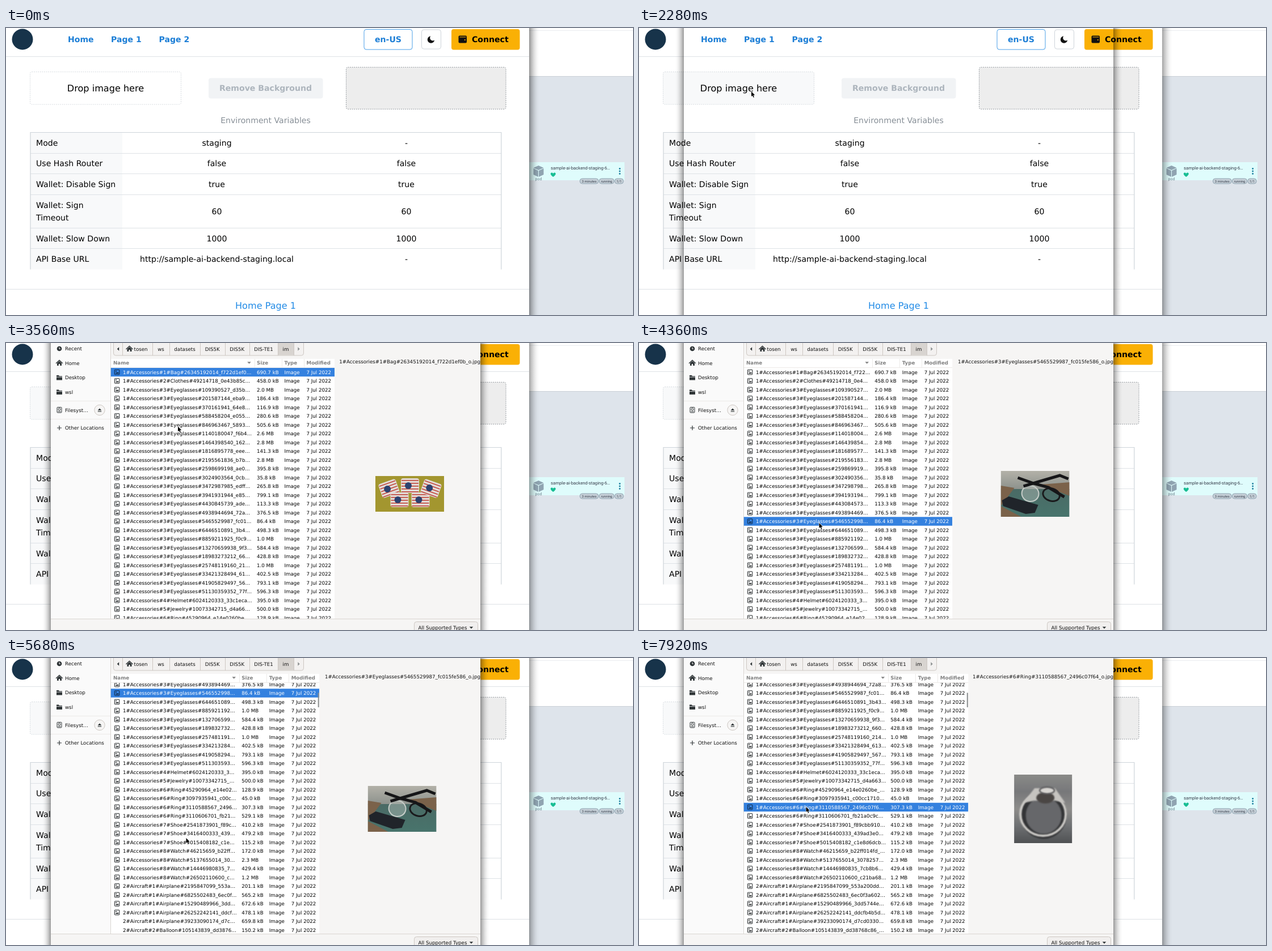
Animation, 1105 px wide and 507 px high, one loop 8 s. Source, as an HTML page with a canvas:

```html
<!DOCTYPE html>
<html lang="en">
<head>
<meta charset="utf-8">
<title>File picker</title>
<style>
html, body { margin: 0; width: 100%; height: 100%; overflow: hidden; background: #fff; }
canvas { display: block; }
</style>
</head>
<body>
<canvas id="stage" width="1105" height="507"></canvas>
<script>
const ctx = document.getElementById('stage').getContext('2d');
ctx.textRendering = 'geometricPrecision';

const LOOP = 8000, TICK = 40;
const SANS = '"DejaVu Sans", sans-serif', ROBOTO = 'Roboto, sans-serif';
const BLUE = '#1c7ed6', INK = '#2e3436', CHROME = '#f6f5f4', EDGE = '#cdc7c2', FAINT = '#eceae8';
const UI = 8.7, ROW = 15.5, NOTCH = 50.6;
const LEFT = 184.5, RIGHT = 836, LIST_TOP = 44, LIST_END = 487;

// Folder, first id, and for a run of files the last id and the count
const FOLDERS = `1#Accessories#1#Bag 26345192014
1#Accessories#2#Clothes 49214718
1#Accessories#3#Eyeglasses 109390527 5465529987 16
1#Accessories#3#Eyeglasses 6446510891 51130359352 8
1#Accessories#4#Helmet 6024120333
1#Accessories#5#Jewelry 10073342715
1#Accessories#6#Ring 45290964
1#Accessories#6#Ring 3097935941
1#Accessories#6#Ring 3110588567
1#Accessories#6#Ring 3110606701
1#Accessories#7#Shoe 2541873901 5015408182 3
1#Accessories#8#Watch 46215659 26502110600 4
2#Aircraft#1#Airplane 2195847099 39233090174 5
2#Aircraft#2#Balloon 105143839`;

// Files that get opened in the preview pane
const PICKS = {
  26345192014: { hash: 'f722d1ef0b', size: '690.7 kB', right: 579, w: 121, h: 63, draw: cookies },
  5465529987: { hash: 'fc015fe586', size: '86.4 kB', right: 552.2, w: 121, h: 81, draw: glasses },
  3097935941: { hash: 'c00cc1710c', size: '45.0 kB', right: 580.3, w: 121, h: 99, draw: beadRing },
  3110588567: { hash: '2496c07f64', size: '307.3 kB', right: 580.3, w: 102, h: 121, draw: silverRing }
};

let seed = 7;
const random = () => (seed = seed * 16807 % 2147483647) / 2147483647;
const randomHash = () => Array.from({ length: 10 }, () => Math.floor(random() * 16).toString(16)).join('');
const randomSize = () => random() < 0.14
  ? (1 + 2 * random()).toFixed(1) + ' MB'
  : (25 + 780 * random() ** 1.3).toFixed(1) + ' kB';

const files = FOLDERS.split('\n').flatMap(line => {
  const [folder, first, last = first, count = 1] = line.split(' ');
  return Array.from({ length: +count }, (_, i) => {
    const id = Math.round(+first + (last - first) * (i / Math.max(1, count - 1)) ** 1.5);
    const pick = PICKS[id];
    return {
      name: `${folder}#${id}_${pick ? pick.hash : randomHash()}_o.jpg`,
      size: pick ? pick.size : randomSize(),
      pick
    };
  });
});

// Timeline: when a row gets selected, when the wheel turns, where the pointer goes
const SELECTED = [[0, -1], [3080, 0], [4200, 17], [6680, 29], [7760, 30]];
const WHEEL = [4680, 4880, 5240, 5280, 5680];
const MOVES = [
  [2480, 2840, 303, 147.5], [3560, 4000, 317.5, 318], [6120, 6360, 314.5, 249.5],
  [7160, 7280, 304.5, 275], [7480, 7680, 294.5, 263]
];

const ramp = (t, a, b) => Math.min(1, Math.max(0, (t - a) / (b - a)));
const easeOut = p => 1 - (1 - p) ** 3;
const overshoot = p => 1 + 2 * (p - 1) ** 3 + (p - 1) ** 2;
const selectedAt = t => SELECTED.filter(s => s[0] <= t).pop()[1];
const scrollAt = t => WHEEL.filter(w => w <= t).length * NOTCH;

function pointerAt(t) {
  const p = ramp(t, 480, 1320);
  let x = 1100 - 902 * overshoot(p), y = 507 - 395 * easeOut(p);
  for (const [from, to, x1, y1] of MOVES) {
    const k = easeOut(ramp(t, from, to));
    x += (x1 - x) * k;
    y += (y1 - y) * k;
  }
  return [x, y];
}

function text(s, x, y, { size = 14.08, color = '#000', weight = 400, align = 'left', font = SANS } = {}) {
  ctx.font = `${weight} ${size}px ${font}`;
  ctx.fillStyle = color;
  ctx.textAlign = align;
  ctx.fillText(s, x, y + size * 0.365);
}
const label = (s, x, y, opts) => text(s, x, y, { size: UI, color: '#111', ...opts });

function rect(x, y, w, h, fill) {
  ctx.fillStyle = fill;
  ctx.fillRect(x, y, w, h);
}

function paint(fill, stroke, width = 1) {
  if (fill) { ctx.fillStyle = fill; ctx.fill(); }
  if (stroke) { ctx.strokeStyle = stroke; ctx.lineWidth = width; ctx.stroke(); }
}

function box(x, y, w, h, r, fill, stroke, dash = []) {
  ctx.beginPath();
  ctx.roundRect(x, y, w, h, r);
  ctx.setLineDash(dash);
  paint(fill, stroke);
  ctx.setLineDash([]);
}

// Points are written as an SVG path
function shape(d, fill, stroke, width = 1) {
  const path = new Path2D(d);
  if (fill) { ctx.fillStyle = fill; ctx.fill(path); }
  if (stroke) { ctx.strokeStyle = stroke; ctx.lineWidth = width; ctx.stroke(path); }
}

function oval(x, y, rx, ry, fill, stroke, width, turn = 0) {
  ctx.beginPath();
  ctx.ellipse(x, y, rx, ry, turn, 0, Math.PI * 2);
  paint(fill, stroke, width);
}

function place(x, y, draw, turn = 0) {
  ctx.save();
  ctx.translate(x, y);
  ctx.rotate(turn);
  draw();
  ctx.restore();
}

const triangle = (x, y, turn, fill = INK) => place(x, y, () => shape('M-3.3-1.7H3.3L0 1.7Z', fill), turn);

function gradient(x0, y0, x1, y1, colors) {
  const g = ctx.createLinearGradient(x0, y0, x1, y1);
  colors.forEach((c, i) => g.addColorStop(i / (colors.length - 1), c));
  return g;
}

function shadow(from, to, strength) {
  const fade = Array.from({ length: 6 }, (_, i) => `rgba(0,0,0,${strength * (1 - i / 5) ** 1.8})`);
  rect(Math.min(from, to), 0, Math.abs(to - from), 507, gradient(from, 0, to, 0, fade));
}

function drawCluster() {
  rect(920, 0, 185, 507, '#fff');
  rect(920, 4, 185, 1, '#e9ecef');
  rect(920, 85, 185, 422, '#dee4eb');
  rect(920, 85, 185, 1, '#c9d0d6');

  rect(920, 237, 170, 32, '#dffcfc');
  place(938.5, 253, () => shape('M0-10 9-6 0-2-9-6ZM-9-5-.5-1V10L-9 6ZM9-5 .5-1V10L9 6Z', '#8fa4b1'));
  text('pod', 938.5, 266, { size: 7, color: '#6d7f8b', align: 'center', font: ROBOTO });
  text('sample-ai-backend-staging-6…', 960, 247.5, { size: 7.75, color: '#363c4a', font: ROBOTO });
  place(964.3, 259, () => shape('M0 4C-9-2-2-6 0-2C2-6 9-2 0 4Z', '#18be94'));
  for (let y = 248.5; y < 258; y += 4.5) oval(1081.7, y, 1.4, 1.4, '#1b7f9e');
  [['3 minutes', 1011.5, 32.5], ['running', 1045.5, 26], ['1/1', 1073, 15]].forEach(([s, x, w]) => {
    box(x, 266, w, 9, 4, '#c6d0d8', '#8fa4b1');
    text(s, x + w / 2, 270.5, { size: 5.9, color: '#363c4a', align: 'center', font: ROBOTO });
  });
}

function drawHeader() {
  const bold = { weight: 700 };
  rect(0, 50, 922, 1, '#dee2e6');
  oval(29, 20, 18.5, 18.5, '#17334a');
  [['Home', 109], ['Page 1', 185], ['Page 2', 269.5]].forEach(([s, x]) => text(s, x, 20, { ...bold, color: BLUE }));
  box(631, 2.5, 85, 35.5, 4, '#fff', '#4a9fe8');
  text('en-US', 673.5, 20, { ...bold, color: BLUE, align: 'center' });
  box(732.5, 3, 34, 34, 4, '#fff', '#ced4da');
  oval(749, 20.5, 6.2, 6.2, '#111');
  oval(752.2, 17.4, 5, 5, '#fff');
  box(785, 2, 120.5, 36.5, 4, '#fab005');
  box(797.5, 13.5, 14.5, 13, 2, '#111');
  rect(799.5, 15.5, 11, 1, '#fab005');
  oval(808.8, 21, 1.1, 1.1, '#fab005');
  text('Connect', 821, 20, bold);
}

function drawTable() {
  const rows = [
    ['Mode', 'staging', '-'], ['Use Hash Router', 'false', 'false'], ['Wallet: Disable Sign', 'true', 'true'],
    ['Wallet: Sign\nTimeout', '60', '60'], ['Wallet: Slow Down', '1000', '1000'],
    ['API Base URL', 'http://sample-ai-backend-staging.local', '-']
  ];
  rect(43, 184, 162, 242.5, '#f8f9fa');
  let y = 184.3;
  for (const [name, a, b] of rows) {
    const lines = name.split('\n'), h = 14.7 + 22 * lines.length, mid = y + h / 2;
    rect(43, Math.round(y - 0.4), 830, 1, y > 185 ? '#dee2e6' : '#ced4da');
    lines.forEach((s, i) => text(s, 53, mid + 22 * (i - (lines.length - 1) / 2)));
    text(a, 371.5, mid, { align: 'center' });
    text(b, 705.5, mid, { align: 'center' });
    y += h;
  }
  rect(42.4, 184, 1.2, 242.5, '#ced4da');
  rect(872.2, 184, 1.2, 242.5, '#ced4da');
}

function drawPage(t) {
  const dots = [1.8, 1.8], center = { align: 'center' };
  rect(0, 0, 922, 507, '#fff');
  drawHeader();
  box(42.5, 77.5, 266, 57.5, 3, t >= 1080 ? '#f8f9fa' : '#fff', '#d3d8dd', dots);
  text('Drop image here', 175.5, 106, { ...center, size: 16.1 });
  box(357, 88.5, 201.5, 36, 4, '#f1f3f5');
  text('Remove Background', 457.5, 106, { ...center, color: '#adb5bd', weight: 700 });
  box(599.5, 69.3, 281.5, 74, 3, '#ededed', '#8a9096', dots);
  text('Environment Variables', 457.5, 163, { ...center, color: '#868e96' });
  drawTable();
  rect(0, 461, 922, 1, '#dee2e6');
  text('Home Page 1', 457.5, 490.5, { ...center, size: 16.1, color: '#228be6' });
  shadow(922, 940, 0.42 - 0.06 * ramp(t, 1880, 1960));
}

const house = (x, y) => place(x, y, () => {
  shape('M-6 .5 0-5 6 .5', null, INK, 1.3);
  shape('M-4 0 0-3.4 4 0V4.5H1.2V1.5H-1.2V4.5H-4Z', INK);
});

const folder = (x, y) => place(x, y, () => {
  shape('M-5-4H-1L0-2.6H5V4.5H-5Z', INK);
  rect(-5, -1.3, 10, 0.8, '#fafafa');
});

function drawSidebar() {
  rect(79, 0, 105, LIST_END, '#fafafa');
  rect(184, 0, 1, LIST_END, '#dad6d2');
  oval(94, 10, 4.3, 4.3, INK);
  shape('M94 7.5V10.3H96', null, '#fff');
  house(94, 35.5);
  folder(94, 61);
  folder(94, 86.5);
  rect(79, 102, 105, 1, FAINT);
  rect(79, 134, 105, 1, FAINT);
  box(90, 113.5, 8, 9.5, 1, null, INK);
  oval(94, 117, 2, 2, null, INK);
  rect(91.5, 120.5, 5, 1, INK);
  oval(165, 118.5, 9.2, 9.2, CHROME, EDGE);
  triangle(165, 117.3, Math.PI);
  rect(161.8, 120.3, 6.4, 1.2, INK);
  shape('M90 150H98M94 146V154', null, INK, 1.2);
  ['Recent', 'Home', 'Desktop', 'wsl'].forEach((s, i) => label(s, 104, 10 + i * 25.6));
  label('Filesyst…', 104, 118.5);
  label('Other Locations', 104, 150);
}

function drawPathBar() {
  box(189.5, -8, 335, 30, 4, '#f3f1f0', EDGE);
  rect(479, 0, 28, 21.5, '#d8d4d0');
  rect(205, 0, 1, 22, EDGE);
  triangle(197.5, 10.5, Math.PI / 2);
  house(217.5, 10.5);
  label('tosen', 225.5, 10.5);
  let x = 258;
  const crumbs = [['ws', 30], ['datasets', 54], ['DIS5K', 43.5], ['DIS5K', 43.5], ['DIS-TE1', 50], ['im', 28]];
  for (const [s, w] of crumbs) {
    rect(Math.round(x), 0, 1, 22, EDGE);
    label(s, x + w / 2, 10.5, { align: 'center' });
    x += w;
  }
  rect(x, 0, 1, 22, EDGE);
  triangle(516, 10.5, -Math.PI / 2, '#8b8e8f');
}

const imageIcon = (y, color) => place(195.6, y, () => {
  box(-4.2, -4.3, 8.4, 8.6, 0.8, null, color);
  shape('M-3 2.6-1 .2 .3 1.3 1.7-.2 3.2 2.6ZM-2.6-2.4H-.6V-1H-2.6Z', color);
});

function fit(s, room) {
  ctx.font = `400 ${UI}px ${SANS}`;
  if (ctx.measureText(s).width <= room) return s;
  while (ctx.measureText(s + '…').width > room) s = s.slice(0, -1);
  return s + '…';
}

function drawList(t, right) {
  const scroll = scrollAt(t), selected = selectedAt(t);
  const columns = [['Size', right - 137], ['Type', right - 88.5], ['Modified', right - 49.5]];
  rect(185, 28, right - 185, LIST_END - 28, '#fff');
  ctx.save();
  ctx.beginPath();
  ctx.rect(LEFT, LIST_TOP, right - LEFT, LIST_END - LIST_TOP);
  ctx.clip();
  files.forEach((f, i) => {
    const top = 51.5 + i * ROW, y = top - scroll, on = i === selected;
    const color = on ? '#fff' : '#000';
    // Thumbnails arrive shortly after a row scrolls into view
    const ready = t >= 3320 && top - scrollAt(t - 80) < LIST_END + 14;
    if (on) rect(LEFT, y - ROW / 2, right - LEFT, ROW, '#3481df');
    if (ready) imageIcon(y, on ? '#0d2540' : '#1c2022');
    label(fit(f.name, right - 350.5), 206, y, { color });
    [f.size, 'Image', '7 Jul 2022'].forEach((s, c) => label(s, columns[c][1], y, { color }));
  });
  if (scroll) box(right - 2.5, 46 + scroll * 0.06, 2, 26, 1, '#8b8e8f');
  ctx.restore();

  const head = { color: '#808080', weight: 700 };
  label('Name', 189, 35, head);
  triangle(right - 150.5, 35, 0, '#808080');
  columns.forEach(([s, x]) => {
    label(s, x, 35, head);
    rect(Math.round(x - 4.5), 28, 1, 15, FAINT);
  });
  rect(185, 43, right - 185, 1, FAINT);
}

function cookies() {
  rect(0, 0, 121, 63, '#a3962f');
  for (let i = 0; i < 5; i++) {
    const low = i % 2;
    place(24 + i * 18.5, low ? 42 : 22 - 5 * Math.sin(i * Math.PI / 4), () => {
      box(-16, -13, 32, 26, 4, '#e3dcd8');
      for (let s = -10; s < 12; s += 5) rect(-15, s, 30, 1.6, '#c0453a');
      oval(-3, 0, 6, 6, '#2c4270');
    }, low ? 0 : (i - 2) * 0.17);
  }
}

function glasses() {
  rect(0, 0, 121, 33, gradient(0, 0, 0, 33, ['#b3b1a8', '#8c918c']));
  rect(0, 32, 121, 49, gradient(0, 32, 0, 81, ['#4a6a65', '#48746c']));
  shape('M0 26 24 30 0 62ZM70 24 121 20V44ZM0 62 36 81H0Z', '#7b624a');
  shape('M2 52 14 45 66 60 60 74 44 76 4 62Z', '#20242a');
  oval(52, 40, 15, 14, 'rgba(190,200,196,.4)', '#c7cdc9', 2, 0.2);
  oval(89, 42, 15, 11, null, '#1a1a1c', 3, 0.3);
  shape('M30 12 58 22 84 29 112 46M40 27 70 18 104 8 119 14', null, '#161618', 5);
}

function beadRing() {
  ctx.filter = 'blur(1.5px)';
  rect(-5, -5, 131, 109, gradient(0, 0, 40, 99, ['#6b5c52', '#a8937d', '#b58a5c']));
  shape('M30 0H121V30L70 16Z', '#c3a684');
  oval(78, 42, 42, 22, '#8a6a42', '#cdbb96', 6, 0.3);
  shape('M12 20 46 42 118 60 106 80 52 92 8 86Z', '#d6cec2');
  shape('M20 46 52 60 108 70M18 70 52 77 100 77', null, '#8f7761', 3);
  for (let i = 0; i < 5; i++) oval(5 + i % 2 * 5, 6 + i * 14, 7, 7, '#79c4c9');
  ctx.filter = 'none';
}

function silverRing() {
  ctx.filter = 'blur(1.2px)';
  rect(-5, -5, 112, 131, gradient(0, 0, 0, 121, ['#8a8a88', '#77787a', '#8d8c8a', '#6e7072', '#505254']));
  oval(52, 72, 36, 37, '#66676a', '#333436', 9);
  oval(51, 70, 40, 38, null, '#d2d0cc', 4);
  shape('M16 50 36 24H72L90 50 72 46H36Z', '#c6c4c0');
  oval(55, 41, 16, 10, '#4a4644');
  oval(58, 28, 13, 6, '#d8d6d2', '#47474a', 2);
  ctx.filter = 'none';
}

function drawPreview({ name, pick: { right, w, h, draw } }) {
  label(name, RIGHT, 32.5, { align: 'right' });
  place((right + 8 + RIGHT) / 2 - w / 2, 266.5 - h / 2, () => {
    ctx.beginPath();
    ctx.rect(0, 0, w, h);
    ctx.clip();
    draw();
  });
}

function drawDialog(t) {
  const strength = 0.4 * ramp(t, 2120, 2280);
  shadow(79, 64, strength);
  shadow(RIGHT, 852, strength);
  if (t < 2360) return;
  rect(79, 0, RIGHT - 79, 507, CHROME);
  drawSidebar();
  drawPathBar();
  const file = files[selectedAt(t)];
  if (t >= 2640) drawList(t, file ? file.pick.right : RIGHT);
  if (file) drawPreview(file);
  rect(79, LIST_END, RIGHT - 79, 20, CHROME);
  rect(79, LIST_END, RIGHT - 79, 1, '#dad6d2');
  box(719.5, 492.5, 112, 24, 4, '#f1efee', EDGE);
  label('All Supported Types', 726.5, 503);
  triangle(820, 503, 0);
}

function drawPointer(t) {
  if (t < 520) return;
  const arrow = 'M0 0V9L2 7.2 3.6 10.8 5 10.2 3.5 6.7 6.2 6.4Z';
  place(...pointerAt(t), () => {
    shape(arrow, null, '#fff', 1.2);
    shape(arrow, '#000');
  });
}

function render(t) {
  drawCluster();
  drawPage(t);
  if (t >= 2160) drawDialog(t);
  drawPointer(t);
}

const start = performance.now();
let shown = -1;
function loop() {
  const t = Math.floor((performance.now() - start) % LOOP / TICK) * TICK;
  if (t !== shown) render(shown = t);
  requestAnimationFrame(loop);
}
loop();
</script>
</body>
</html>
```
